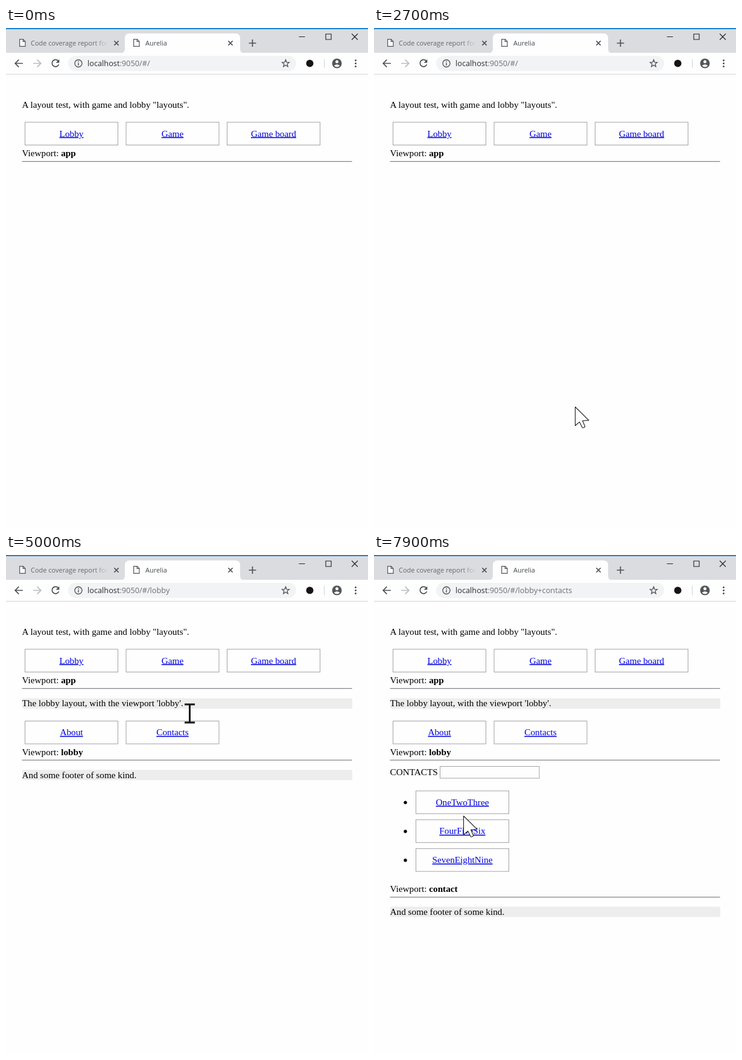
An HTML page for the animation above (8 s loop, 600 by 825 pixels).

```html
<!DOCTYPE html>
<html lang="en">
<head>
<meta charset="utf-8">
<title>Layout test</title>
<style>
  html, body { margin: 0; width: 100%; height: 100%; overflow: hidden; background: #fefefe; }
  svg { display: block; width: 100vw; height: 100vh; }
  .ui { font-family: "Open Sans", "Noto Sans", sans-serif; }
  .page { font: 15.25px "Liberation Serif", "Times New Roman", serif; }
  .link { fill: #0000e0; text-decoration: underline; text-anchor: middle; }
  .link.active { fill: #cc2414; }
  .box { fill: #fefefe; stroke: #a3a3a9; }
  .rule { stroke: #85858b; stroke-width: 1.2; }
  .bar { fill: #ededee; }
  .icon { fill: none; stroke: #4c4f53; stroke-width: 1.7; }
  .thin { fill: none; stroke: #222; stroke-width: 1.1; }
</style>
</head>
<body>
<svg viewBox="0 0 600 825" preserveAspectRatio="none">
  <defs>
    <linearGradient id="fade" gradientUnits="userSpaceOnUse" x1="145" x2="169" y1="0" y2="0">
      <stop stop-color="#63666a"/><stop offset="1" stop-color="#63666a" stop-opacity="0"/>
    </linearGradient>
    <clipPath id="titleClip"><rect x="40" y="12" width="129" height="26"/></clipPath>
    <path id="file" d="M.6 .6H6.4L10 4.2V12.4H.6ZM6.2 .8V4.4H9.8" fill="#fafafa" stroke="#55585c" stroke-width="1.2"/>
    <path id="close" d="M-3.6 -3.6L3.6 3.6M3.6 -3.6L-3.6 3.6" fill="none" stroke="#4c4f53" stroke-width="1.5"/>
  </defs>

  <rect width="600" height="825" fill="#fefefe"/>
  <g class="ui">
    <rect width="600" height="42" fill="#dadcdf"/>
    <rect width="600" height="2" fill="#1b86d1"/>
    <path d="M189 42Q197 42 197 34V17Q197 9 205 9H380Q388 9 388 17V34Q388 42 396 42Z" fill="#fefefe"/>
    <rect y="41" width="600" height="35" fill="#fefefe"/>
    <path d="M0 76.5H600" stroke="#d3d4d6"/>
    <use href="#file" x="22" y="18"/>
    <use href="#file" x="211" y="18"/>
    <text x="41" y="29" font-size="11" fill="url(#fade)" clip-path="url(#titleClip)">Code coverage report for</text>
    <text x="231" y="29" font-size="11" fill="#45484c">Aurelia</text>
    <use href="#close" x="183" y="25"/>
    <use href="#close" x="372" y="25"/>
    <path class="icon" d="M402.500 25H414.500M408.500 19V31"/>
    <path class="thin" d="M485.500 14.500H495.500M530 10H539V19H530ZM573 9.500L583 19.500M583 9.500L573 19.500"/>

    <path class="icon" d="M28 58.500H15.500M21.300 52.300L15.200 58.500L21.300 64.700"/>
    <path class="icon" style="stroke:#b8babd" d="M45 58.500H57.500M51.700 52.300L57.800 58.500L51.700 64.700"/>
    <path class="icon" d="M86.500 54.300A5.800 5.800 0 1 0 87.500 60.300"/>
    <path d="M88.300 51.800V57.500H82.600Z" fill="#4c4f53"/>
    <rect x="103" y="46" width="378" height="25" rx="12.500" fill="#f1f3f4"/>
    <circle cx="120" cy="58.500" r="6" class="icon" style="stroke-width:1.300"/>
    <path class="icon" style="stroke-width:1.400" d="M120 57.500V62M120 54.700V56.200"/>
    <text x="135" y="63" font-size="12.750" fill="#6c7074"><tspan fill="#2b2d30">localhost</tspan>:9050/#/<tspan id="route"></tspan></text>
    <path id="star" class="icon" style="stroke-width:1.300"/>
    <circle cx="503.500" cy="58.500" r="6" fill="#151515"/>
    <path d="M527.500 51V66" stroke="#cfd1d4"/>
    <circle cx="548.500" cy="58.500" r="8" fill="#53565a"/>
    <circle cx="548.500" cy="55.700" r="2.500" fill="#fefefe"/>
    <path d="M543.600 62.500Q548.500 58 553.400 62.500Q548.500 66.500 543.600 62.500Z" fill="#fefefe"/>
    <g fill="#4c4f53"><circle cx="579.500" cy="53.500" r="1.500"/><circle cx="579.500" cy="58.500" r="1.500"/><circle cx="579.500" cy="63.500" r="1.500"/></g>
  </g>

  <g class="page">
    <g id="app"></g>
    <g id="lobby"></g>
    <g id="contacts"></g>
    <g id="footer"></g>
  </g>

  <g id="pointer">
    <path id="arrow" d="M.5 .5V31.500L7.500 25.300L12.300 34.800Q15 35.800 16.800 33L12.600 23.300L23 22.600Z" fill="#fefefe" stroke="#1b1b1f" stroke-width="1.100" stroke-linejoin="round"/>
    <path id="hand" d="M-2.500 2Q-2.500 -.7 .4 -.7Q3 -.7 3 2V12Q3 9.500 5.800 9.700Q8.700 9.900 8.800 12.500Q9.300 10.800 11.600 11.200Q14.300 11.600 14.400 14.500Q15 13 17.300 13.500Q20.300 14 20.300 17V29Q20.300 36 15.500 40Q12.500 42.700 7.500 42.600Q1.500 42.400 -2 37.500L-10.800 26Q-12 22.800 -8.700 22Q-6.500 21.800 -2.500 26.300ZM3 12V20M8.800 12.500V20.500M14.400 14.500V21" fill="#fefefe" stroke="#1b1b1f" stroke-width="1.200" stroke-linejoin="round"/>
    <path id="beam" d="M-8 -15H9M.5 -15V15M-8 15H9" fill="none" stroke="#161616" stroke-width="3"/>
  </g>
</svg>
<script>
const LOOP = 8000, STEP = 100;
const PRESS_AT = 4050, LOBBY_AT = 4300, CONTACTS_AT = 5800;
const $ = id => document.getElementById(id);

const links = [];
const label = (x, y, text) => `<text x="${x}" y="${y}">${text}</text>`;
const bar = (y, text) => `<rect class="bar" x="27" y="${y}" width="547" height="17" rx="2"/>` + label(26.5, y + 13.3, text);
const viewport = (y, name) =>
  label(26.5, y, `Viewport: <tspan font-weight="bold">${name}</tspan>`) +
  `<path class="rule" d="M26.500 ${y + 8.6}H573.500"/>`;

function link(x, y, text, since) {
  links.push({ x, y, since });
  return `<rect class="box" x="${x}" y="${y}" width="154" height="37.700"/>` +
    `<text class="link" x="${x + 77}" y="${y + 23.7}">${text}</text>`;
}

$('app').innerHTML =
  label(26.5, 132, 'A layout test, with game and lobby "layouts".') +
  ['Lobby', 'Game', 'Game board'].map((s, i) => link(31.5 + i * 167.5, 155.8, s, 0)).join('') +
  viewport(212, 'app');

$('lobby').innerHTML =
  bar(237, "The lobby layout, with the viewport 'lobby'.") +
  ['About', 'Contacts'].map((s, i) => link(31.5 + i * 167.5, 274.5, s, LOBBY_AT)).join('') +
  viewport(330.6, 'lobby');

$('contacts').innerHTML =
  label(26.5, 363.7, 'CONTACTS') +
  '<rect class="box" x="109.500" y="349.500" width="164.500" height="19.500"/>' +
  ['OneTwoThree', 'FourFiveSix', 'SevenEightNine'].map((s, i) => {
    const y = 390 + i * 47.7;
    return `<circle cx="52" cy="${y + 19.3}" r="2.700"/>` + link(69.5, y, s, CONTACTS_AT);
  }).join('') +
  viewport(557, 'contact');

$('footer').innerHTML = bar(0, 'And some footer of some kind.');

$('star').setAttribute('d', 'M' + Array.from({ length: 10 }, (_, i) => {
  const r = i % 2 ? 2.7 : 6.3, a = (i / 5 - 0.5) * Math.PI;
  return (463.5 + r * Math.cos(a)).toFixed(1) + ' ' + (58.8 + r * Math.sin(a)).toFixed(1);
}).join('L') + 'Z');

// Pointer stops: time, x, y
const stops = [
  [1400, 428, 706], [1600, 418, 696], [2000, 380, 738], [2400, 318, 668],
  [2700, 333, 626], [3700, 124, 172], [4500, 124, 172], [5000, 304, 262],
  [5400, 302, 297], [6400, 302, 297], [7500, 148, 431], [8000, 148, 431]
];

function pointerAt(t) {
  const i = Math.max(1, stops.findIndex(s => s[0] > t));
  const [t0, x0, y0] = stops[i - 1], [t1, x1, y1] = stops[i];
  const u = (t - t0) / (t1 - t0), k = u * u * (3 - 2 * u);
  return [x0 + (x1 - x0) * k, y0 + (y1 - y0) * k];
}

function pointerKind(x, y, t) {
  const overLink = links.some(b => t >= b.since && x >= b.x && x <= b.x + 154 && y >= b.y && y <= b.y + 38);
  if (overLink) return 'hand';
  return t >= LOBBY_AT && x < 315 && y > 236 && y < 268 ? 'beam' : 'arrow';
}

const show = (id, on) => $(id).setAttribute('visibility', on ? 'inherit' : 'hidden');
const lobbyLink = document.querySelector('#app .link');

function draw(t) {
  const inLobby = t >= LOBBY_AT, inContacts = t >= CONTACTS_AT;
  show('lobby', inLobby);
  show('contacts', inContacts);
  show('footer', inLobby);
  $('footer').setAttribute('transform', `translate(0 ${inContacts ? 581.5 : 355.3})`);
  $('route').textContent = inContacts ? 'lobby+contacts' : inLobby ? 'lobby' : '';
  lobbyLink.classList.toggle('active', t >= PRESS_AT && !inLobby);

  const visible = t >= stops[0][0];
  show('pointer', visible);
  const [x, y] = pointerAt(t), kind = pointerKind(x, y, t);
  $('pointer').setAttribute('transform', `translate(${x.toFixed(1)} ${y.toFixed(1)})`);
  for (const id of ['arrow', 'hand', 'beam']) show(id, id === kind);
}

const start = performance.now();
function tick() {
  const t = (performance.now() - start) % LOOP;
  draw(Math.floor(t / STEP) * STEP);
  requestAnimationFrame(tick);
}
tick();
</script>
</body>
</html>
```
